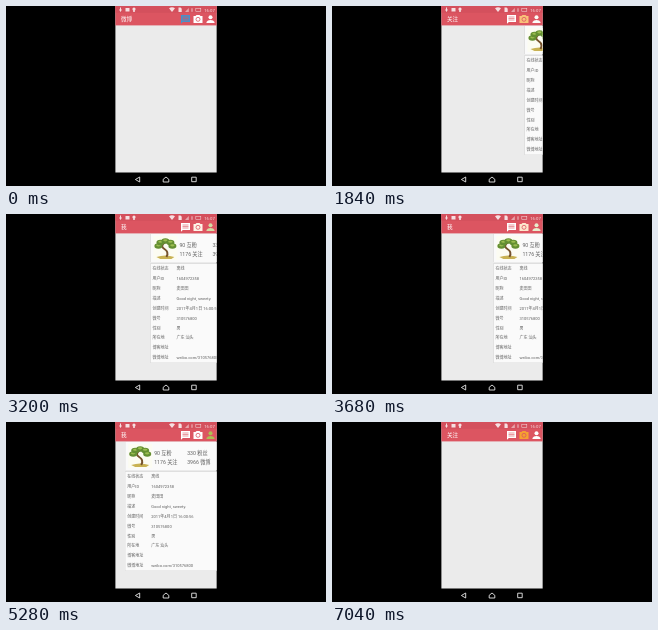
Write an HTML page that moves like this. It is 320x180 px and loops after 7120 ms.

```html
<!DOCTYPE html>
<html lang="zh">
<head>
<meta charset="utf-8">
<style>
html, body { margin: 0; width: 100%; height: 100%; overflow: hidden; background: #000; }
svg { display: block; width: 320px; height: 180px; font-family: Roboto, "Noto Sans CJK SC", "Noto Sans CJK", sans-serif; }
.card { fill: #fafafa; filter: drop-shadow(0 .4px .4px #0005); }
.line { fill: none; stroke: #dc5561; }
</style>
</head>
<body>
<svg viewBox="0 0 320 180">
  <clipPath id="screen"><rect x="109.4" width="101.25" height="166.5"/></clipPath>
  <g clip-path="url(#screen)">
    <rect x="109" width="102" height="167" fill="#ebebeb"/>
    <g id="profile" fill="#606060">
      <rect class="card" y="20" width="98" height="28"/>
      <rect class="card" y="49.5" width="98" height="99.3"/>
      <g transform="translate(3 22)">
        <rect width="24" height="24" fill="#fcfcf2"/>
        <path d="M3 21Q12 18 21 21L18 23H7Z" fill="#c9b253"/>
        <path d="M13 21Q16 16 11 13T12 6" fill="none" stroke="#76532c" stroke-width="2"/>
        <g id="leaves"></g>
      </g>
      <g id="counts" font-size="5.2"></g>
      <g id="rows" font-size="4.05"></g>
    </g>
    <rect x="109" width="102" height="19.4" fill="#dc5561"/>
    <rect x="109" width="102" height="6.8" fill="#d4505d"/>
    <text id="title" x="115" y="15.2" font-size="5.6" fill="#fff"></text>
    <g class="icon">
      <path d="M175 9h9v7h-7.2l-1.800 1.800z"/>
      <path class="line" d="M176.500 11h6m-6 1.500h6m-6 1.500h6" stroke-width=".6"/>
    </g>
    <g class="icon">
      <path d="M187.500 10h2l1-1h3l1 1h2v7h-9z"/>
      <circle class="line" cx="192" cy="13.3" r="2" stroke-width=".8"/>
    </g>
    <g class="icon">
      <circle cx="204.500" cy="11.200" r="2"/>
      <path d="M200.500 17v-1q1-2 4-2t4 2v1z"/>
    </g>
    <g fill="#f6dfe1">
      <path d="M114 1.500h1v2h1L114.500 6 113 3.500h1z"/>
      <rect x="119.500" y="2" width="4" height="3.500"/>
      <circle cx="128" cy="3" r="1.600"/>
      <rect x="127.200" y="3" width="1.600" height="3"/>
      <path d="M163 2.300Q166 0 169 2.300L166 6z"/>
      <path d="M172.500 1.500h2l1.200 1.200V6h-3.200z"/>
      <path d="M179 6h3.800V2z" opacity=".6"/>
      <rect x="185.600" y="2.300" width=".8" height="3.500"/>
      <rect x="189.800" y="2.300" width="5" height="3.200" fill="none" stroke="#f6dfe1" stroke-width=".5"/>
      <text x="198.200" y="5.500" font-size="4.300">16:07</text>
    </g>
  </g>
  <g fill="none" stroke="#e8e8e8" stroke-width=".9" stroke-linejoin="round">
    <path d="M133.700 171v5l-4.300-2.500z"/>
    <path d="M157.200 176v-2.700l2.800-2.300 2.800 2.300V176z"/>
    <rect x="185.700" y="171.200" width="4.500" height="4.500"/>
  </g>
</svg>
<script>
const LOOP = 7120, STEP = 80, WIDTH = 101.25, REST = 111;
const TABS = ['微博', '关注', '我'];
const TINTS = [[74, 144, 200], [245, 160, 48], [158, 180, 52]];
const $ = id => document.getElementById(id);

function add(parent, name, attrs, text = '') {
  const el = document.createElementNS('http://www.w3.org/2000/svg', name);
  for (const key in attrs) el.setAttribute(key, attrs[key]);
  el.textContent = text;
  parent.append(el);
}

// A canopy of leaf clumps on an arc, each with a lighter top
for (let i = 0; i < 5; i++) {
  const angle = Math.PI * i / 4;
  const cx = 12 - 7 * Math.cos(angle), cy = 10 - 5 * Math.sin(angle);
  add($('leaves'), 'ellipse', { cx, cy, rx: 4, ry: 2.8, fill: '#648f32' });
  add($('leaves'), 'ellipse', { cx, cy: cy - 0.7, rx: 2.2, ry: 1.1, fill: '#9cbd50' });
}

['90 互粉', '330 粉丝', '1176 关注', '3966 微博'].forEach((text, i) =>
  add($('counts'), 'text', { x: 29 + 33 * (i % 2), y: 32.5 + 9.3 * (i >> 1) }, text));

Object.entries({
  在线状态: '离线', 用户ID: '1604972358', 昵称: '麦田田', 描述: 'Good night, sweety.',
  创建时间: '2011年4月1日 16:00:56', 微号: '310576800', 性别: '男', 所在地: '广东 汕头',
  博客地址: '', 微博地址: 'weibo.com/310576800'
}).forEach((row, i) => row.forEach((text, col) =>
  add($('rows'), 'text', { x: 2 + 24 * col, y: 56.4 + 9.87 * i }, text)));

const smooth = p => p * p * (3 - 2 * p);
const easeOut = p => Math.sin(p * Math.PI / 2);

// Swipes between tabs: start, end, tab position reached, easing
const swipes = [
  [880, 1440, 1, smooth],
  [1650, 2320, 2, smooth],
  [2640, 3920, 1.48, easeOut],
  [4000, 4780, 2, smooth],
  [5060, 6320, 1, smooth]
];

function positionAt(t) {
  return swipes.reduce((pos, [start, end, to, ease]) => {
    const p = Math.min(1, Math.max(0, (t - start) / (end - start)));
    return pos + (to - pos) * ease(p);
  }, 0);
}

function draw(now) {
  const pos = positionAt(Math.floor(now % LOOP / STEP) * STEP);
  $('profile').setAttribute('transform', `translate(${REST + (2 - pos) * WIDTH} 0)`);
  $('title').textContent = TABS[Math.floor(pos + 0.55)];
  document.querySelectorAll('.icon').forEach((icon, i) => {
    const near = Math.max(0, 1 - Math.abs(pos - i)) ** 2;
    icon.setAttribute('fill', `rgb(${TINTS[i].map(c => Math.round(255 + (c - 255) * near))})`);
  });
}

const start = performance.now();
function tick() {
  draw(performance.now() - start);
  requestAnimationFrame(tick);
}
tick();
</script>
</body>
</html>
```
